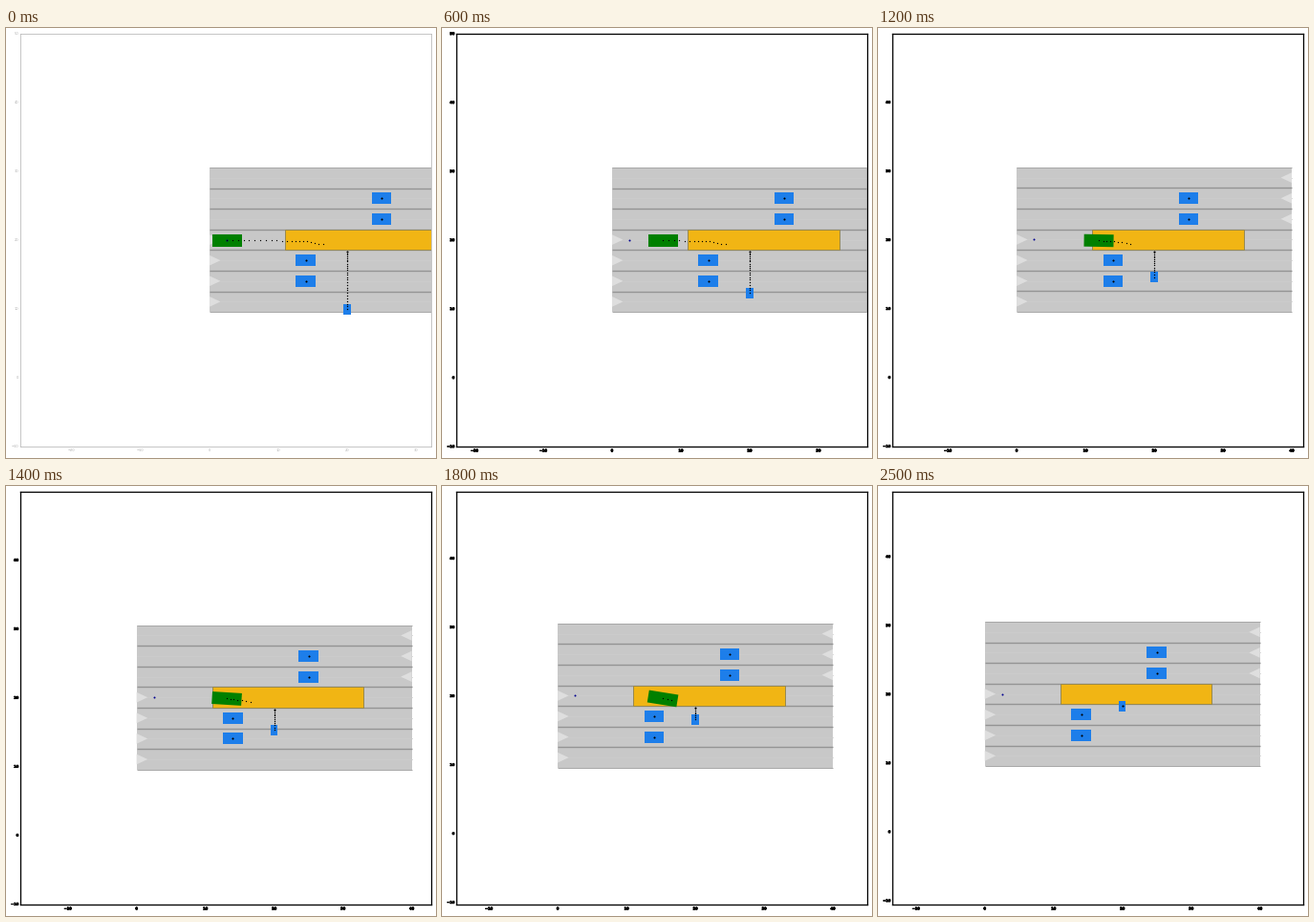
Write a matplotlib script that moves like this. It is 450 by 450 pixels and loops after 2600 ms.

```python
import numpy as np
import matplotlib.pyplot as plt
from matplotlib.animation import FuncAnimation
from matplotlib.patches import Polygon, Rectangle
from matplotlib.patheffects import withStroke
from matplotlib.ticker import MultipleLocator
from matplotlib.transforms import Affine2D

SIZE, DPI, SCALE = 450, 100, 7.2  # SCALE: pixels per metre
FRAMES, INTERVAL = 26, 100
EGO_END = 20
LEFT, RIGHT, TOP, BOTTOM = 15.1, 445.3, 5.6, 437.6
HALF_W, HALF_H = (RIGHT - LEFT) / 2 / SCALE, (BOTTOM - TOP) / 2 / SCALE
CAMERA_OFFSET = 0.12
PX = 72 / DPI
LANE, ROAD = 3, 40
CENTERS = np.arange(11, 30, LANE)
BLUE = "#1d7eea"
PARKED = [(14, 14), (14, 17), (25, 23), (25, 26)]


def travel(start, steps, times, speeds):
    """Positions reached by summing per-step speeds given in pixels."""
    v = np.interp(np.arange(steps) + 0.5, times, speeds) / SCALE
    return start + np.concatenate([[0], np.cumsum(v)])


steps = np.arange(EGO_END + 1)
ego_x = travel(2.52, EGO_END, [0, 6, 9, 12, 14, 16, 20],
               [5.87, 5.8, 5.6, 4.9, 3.5, 3.85, 4.95])
ego_y = 20 - CAMERA_OFFSET - np.interp(steps, [0, 9, 12, 14, 16, 18, 20],
                                       [0, 0, 0.2, 0.4, 0.8, 2.2, 4]) / SCALE
ego_angle = -np.interp(steps, [0, 9, 12, 14, 16, 20], [0, 0, 1, 3.5, 6.9, 11.3])
walker_y = travel(9.9, FRAMES - 1, [0, 8, 14, 20, 25], [2.88, 2.8, 2.5, 1.9, 1.4])

fig = plt.figure(figsize=(SIZE / DPI, SIZE / DPI), dpi=DPI, facecolor="white")
ax = fig.add_axes([LEFT / SIZE, 1 - BOTTOM / SIZE,
                   (RIGHT - LEFT) / SIZE, (BOTTOM - TOP) / SIZE])


def box(x, y, w, h, color, angle=0, z=5, **style):
    turn = Affine2D().rotate_deg_around(x, y, angle) + ax.transData
    ax.add_patch(Rectangle((x - w / 2, y - h / 2), w, h, facecolor=color,
                           transform=turn, zorder=z, **style))


def dots(x, y, color="black", size=1.3, z=8):
    ax.plot(x, y, ls="none", marker="o", ms=size * PX, mew=0, color=color, zorder=z)


def draw_road():
    low, high = CENTERS[0] - LANE / 2, CENTERS[-1] + LANE / 2
    box(ROAD / 2, (low + high) / 2, ROAD, high - low, "#c8c8c8", z=1)
    for y in CENTERS:
        ax.plot([0, ROAD], [y, y], color="#cdcdcd", lw=0.8 * PX, zorder=2)
        base, tip = (0, 1.6) if y <= 20 else (ROAD, ROAD - 1.6)
        ax.add_patch(Polygon([(base, y - 0.75), (base, y + 0.75), (tip, y)],
                             facecolor="#dedede", zorder=2))
    for y in np.arange(low, high + 1, LANE):
        outer = y in (low, high)
        ax.plot([0, ROAD], [y, y], color="#a8a8a8" if outer else "#949494",
                lw=(1 if outer else 1.4) * PX, solid_capstyle="butt", zorder=3)


def draw_frame(first):
    """Faint hairlines on the opening frame, heavy overdrawn ones afterwards."""
    ax.xaxis.set_major_locator(MultipleLocator(10))
    ax.yaxis.set_major_locator(MultipleLocator(10))
    ax.tick_params(length=0, labelsize=2.6,
                   labelcolor="#b0b0b0" if first else "black")
    ax.tick_params(axis="x", pad=2)
    ax.tick_params(axis="y", pad=1.4)
    outline = [] if first else [withStroke(linewidth=0.8 * PX, foreground="black")]
    for label in ax.get_xticklabels() + ax.get_yticklabels():
        label.set_fontweight("normal" if first else "bold")
        label.set_path_effects(outline)
    for spine in ax.spines.values():
        spine.set_linewidth((0.8 if first else 1.3) * PX)
        spine.set_color("#b8b8b8" if first else "black")


def update(i):
    ax.clear()
    k = min(i, EGO_END)
    cx, cy = ego_x[k] - CAMERA_OFFSET, ego_y[k] + CAMERA_OFFSET
    ax.set_xlim(cx - HALF_W, cx + HALF_W)
    ax.set_ylim(cy - HALF_H, cy + HALF_H)
    draw_frame(i == 0)
    draw_road()
    box(22, 20, 22, LANE, "#f1b514", z=4, edgecolor="#98894f", lw=1 * PX)
    dots([2.5], [20], "#000090", 2)
    for x, y in PARKED:
        box(x, y, 2.85, 1.65, BLUE)
        dots([x], [y], size=2.1)
    box(20, walker_y[i], 1, 1.5, BLUE)
    path = walker_y[i:]
    dots(np.full(len(path), 20), path, size=1.4)
    dots([20], path[-1:], size=2)
    if i <= EGO_END:
        box(ego_x[k], ego_y[k], 4.3, 1.8, "#008000", ego_angle[k], z=6)
        dots(ego_x[k:], ego_y[k:])
    return []


anim = FuncAnimation(fig, update, frames=FRAMES, init_func=lambda: [],
                     interval=INTERVAL, repeat=True, repeat_delay=0)
plt.show()
```
